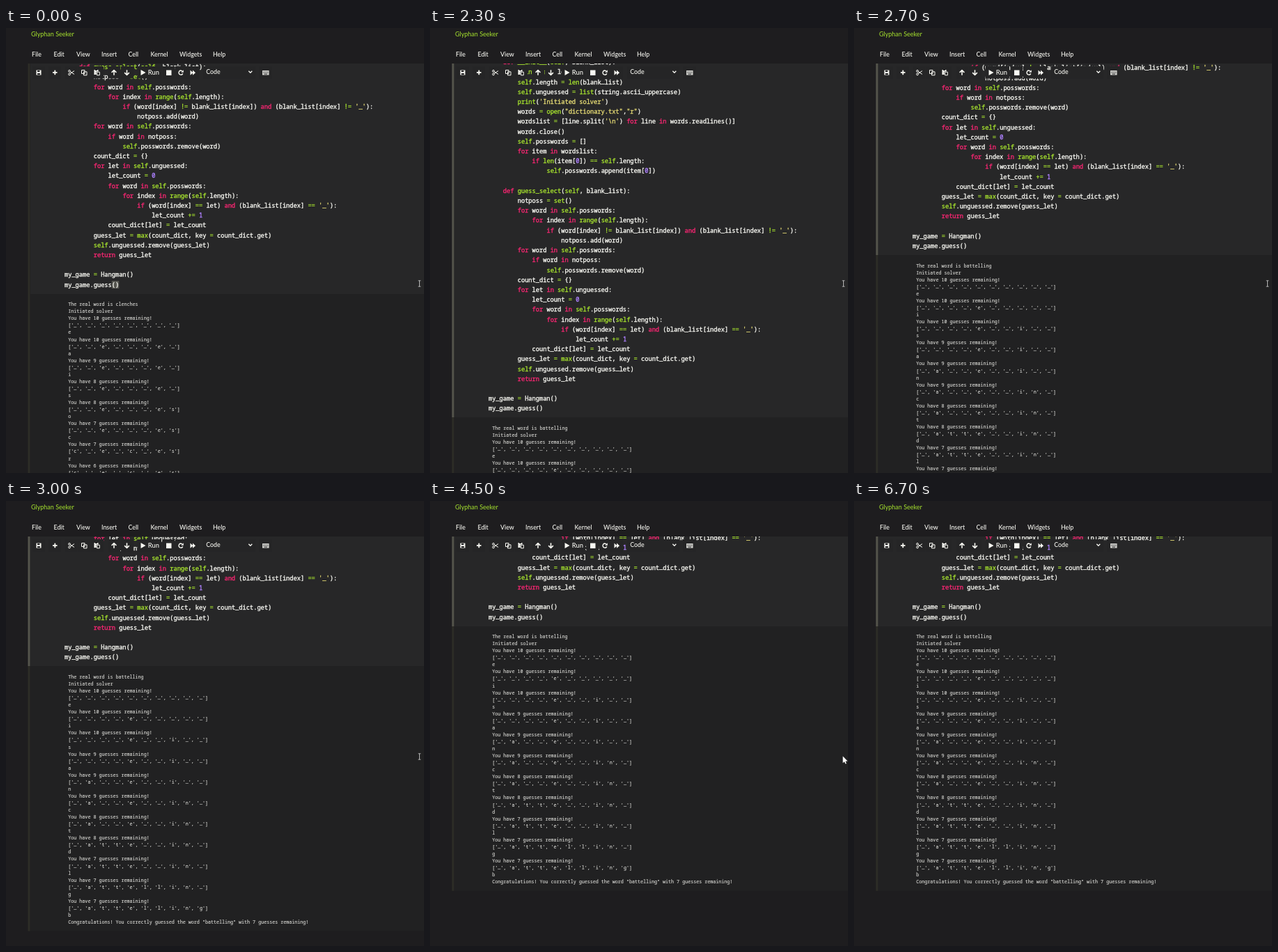
Animation, 600 px wide and 639 px high, one loop 6900 ms. Source, as an HTML page with a canvas:

```html
<!DOCTYPE html>
<html lang="en">
<head>
<meta charset="utf-8">
<title>Notebook</title>
<style>
html, body { margin: 0; width: 100%; height: 100%; overflow: hidden; background: #1e1d1f; }
canvas { display: block; }
</style>
</head>
<body>
<canvas id="stage" width="600" height="639"></canvas>
<script>
const ctx = document.getElementById('stage').getContext('2d');
const W = 600, H = 639, LOOP = 6900, STEP = 100, RUN_AT = 300;
const MONO = '"Noto Sans Mono", "DejaVu Sans Mono", monospace';
const SANS = 'Lato, "Open Sans", sans-serif';
const CODE = { x: 84, adv: 5.215, size: 8.69, lead: 14.206, weight: 0.35 };
const OUT = { x: 89.3, size: 6.7, lead: 10.06, top: 28.2, weight: 0.12 };
const INK = '#f8f8f2', GREEN = '#a6e22e', PINK = '#f92672', PURPLE = '#ae81ff', YELLOW = '#e6db74';
const PAGE = '#1e1d1f', INPUT = '#272728', OUTPUT = '#212122', BUTTON = '#252526';
const BAR = '#55554c', BAR_DIM = '#2d2d27', TOP = 51;

const source = String.raw`    def __init__(self, blank_list):
        print(self.length)
        self.length = len(blank_list)
        self.unguessed = list(string.ascii_uppercase)
        print('Initiated solver')
        words = open("dictionary.txt","r")
        wordslist = [line.split('\n') for line in words.readlines()]
        words.close()
        self.posswords = []
        for item in wordslist:
            if len(item[0]) == self.length:
                self.posswords.append(item[0])

    def guess_select(self, blank_list):
        notposs = set()
        for word in self.posswords:
            for index in range(self.length):
                if (word[index] != blank_list[index]) and (blank_list[index] != '_'):
                    notposs.add(word)
        for word in self.posswords:
            if word in notposs:
                self.posswords.remove(word)
        count_dict = {}
        for let in self.unguessed:
            let_count = 0
            for word in self.posswords:
                for index in range(self.length):
                    if (word[index] == let) and (blank_list[index] == '_'):
                        let_count += 1
            count_dict[let] = let_count
        guess_let = max(count_dict, key = count_dict.get)
        self.unguessed.remove(guess_let)
        return guess_let

my_game = Hangman()
my_game.guess()`;

const rules = [
  [/^('[^']*'|"[^"]*")/, YELLOW],
  [/^(for|in|if|and|def|return)\b/, PINK],
  [/^(self|range|len|list|set|open|max|print|__init__|guess_select)\b/, GREEN],
  [/^\w*[A-Za-z_]\w*/, INK],
  [/^\d+/, PURPLE],
  [/^[!=+]?=/, GREEN],
  [/^[^\w\s'"=!+]+/, INK]
];

function tokenize(line) {
  const tokens = [];
  for (let col = 0; col < line.length;) {
    const rest = line.slice(col);
    const rule = rules.find(r => r[0].test(rest));
    const text = rule ? rule[0].exec(rest)[0] : rest[0];
    if (rule) tokens.push({ col, text, color: rule[1] });
    col += text.length;
  }
  return tokens;
}
const codeLines = source.split('\n').map(tokenize);

// Plays one round and returns everything it prints.
function playRound(word, guesses) {
  const lines = ['The real word is ' + word, 'Initiated solver'];
  let left = 10, known = '';
  const status = () => {
    const cells = [...word].map(c => `'${known.includes(c) ? c : '_'}'`);
    lines.push(`You have ${left} guesses remaining!`, `[${cells.join(', ')}]`);
  };
  status();
  for (const letter of guesses) {
    known += letter;
    if (!word.includes(letter)) left--;
    lines.push(letter);
    if ([...word].every(c => known.includes(c))) {
      lines.push(`Congratulations! You correctly guessed the word "${word}" with ${left} guesses remaining!`);
    } else status();
  }
  return lines;
}
const firstRun = playRound('clenches', 'eaisocr');
const secondRun = playRound('battelling', 'eisanctdlgb');

// [time, y of the last code line]
const scrollKeys = [[2300, 546.3], [2500, 430], [2700, 313], [3000, 224.3], [3300, 166.5]];
function scrollAt(t) {
  if (t < RUN_AT) return 368.6;
  if (t <= scrollKeys[0][0]) return scrollKeys[0][1];
  for (let i = 1; i < scrollKeys.length; i++) {
    const [t0, y0] = scrollKeys[i - 1], [t1, y1] = scrollKeys[i];
    if (t <= t1) return y0 + (y1 - y0) * (t - t0) / (t1 - t0);
  }
  return scrollKeys[scrollKeys.length - 1][1];
}
function outputAt(t) {
  if (t < RUN_AT) return firstRun;
  const count = t < 400 ? 0 : t < 600 ? 2 : t < 1200 ? 4 : t < 2400 ? 7 : secondRun.length;
  return secondRun.slice(0, count);
}

function box(x, y, w, h, color) {
  ctx.fillStyle = color;
  ctx.fillRect(x, y, w, h);
}
function label(text, x, y, font, color = INK, weight = 0) {
  ctx.font = font;
  ctx.fillStyle = ctx.strokeStyle = color;
  ctx.fillText(text, x, y);
  if (weight) {
    ctx.lineWidth = weight;
    ctx.strokeText(text, x, y);
  }
}
// Monospaced text with its underscores raised to the baseline.
function mono(text, x, y, style, color) {
  const font = `${style.size}px ${MONO}`;
  label(text.replace(/_/g, ' '), x, y, font, color, style.weight);
  if (text.includes('_')) {
    label(text.replace(/[^_]/g, ' '), x, y - style.size * 0.13, font, color, style.weight);
  }
}
function poly(points, color = INK) {
  ctx.fillStyle = color;
  ctx.beginPath();
  points.forEach(p => ctx.lineTo(p[0], p[1]));
  ctx.fill();
}
function stroke(width, draw, color = INK) {
  ctx.strokeStyle = color;
  ctx.lineWidth = width;
  ctx.beginPath();
  draw();
  ctx.stroke();
}
function segment(x0, y0, x1, y1) {
  ctx.moveTo(x0, y0);
  ctx.lineTo(x1, y1);
}

function drawCell(t) {
  const y = scrollAt(t), lines = outputAt(t), editing = t < RUN_AT;
  const split = Math.round(y + 13);
  box(35, TOP, W - 35, split - TOP, INPUT);
  box(31.5, TOP, 3, split - TOP, editing ? BAR_DIM : BAR);
  if (lines.length) {
    const bottom = y + OUT.top + (lines.length - 1) * OUT.lead + 13;
    box(35, split, W - 35, bottom - split, OUTPUT);
    box(31.5, split, 3, bottom - split, BAR_DIM);
  }
  if (editing) box(CODE.x + 13 * CODE.adv, y - 5.5, 2 * CODE.adv, 11, '#55554f');
  codeLines.forEach((tokens, i) => {
    const base = y + 3.1 - (codeLines.length - 1 - i) * CODE.lead;
    if (base < 48) return;
    for (const k of tokens) mono(k.text, CODE.x + k.col * CODE.adv, base, CODE, k.color);
  });
  lines.forEach((s, i) => mono(s, OUT.x, y + OUT.top + 2.4 + i * OUT.lead, OUT, '#d8d8d4'));
}

function drawHeader() {
  box(0, 0, W, TOP, PAGE);
  label('Glyphan Seeker', 36, 11.8, `9px ${SANS}`, GREEN);
  const menu = { File: 37, Edit: 68.5, View: 101, Insert: 137, Cell: 175.5, Kernel: 207.5, Widgets: 249, Help: 297 };
  for (const name in menu) label(name, menu[name], 41, `500 8.8px ${SANS}`);
}

function drawToolbar() {
  const buttons = [[38, 18], [61, 18], [85, 17], [103, 18], [122, 18], [147, 17], [165, 18],
    [189, 34], [225, 17], [243, 17], [260, 17], [283, 75], [363, 19]];
  for (const [x, w] of buttons) box(x, 55, w, 17.5, BUTTON);

  // save, add
  box(43.5, 60.5, 7, 7, INK);
  box(45, 61, 3.5, 2, BUTTON);
  box(45, 65, 4, 2, BUTTON);
  box(67, 63, 6.5, 1.8, INK);
  box(69.4, 60.6, 1.8, 6.6, INK);

  // cut
  stroke(1, () => {
    segment(92, 62.5, 98, 66.5);
    segment(92, 65.7, 98, 61.5);
    for (const y of [61.8, 66.4]) {
      ctx.moveTo(92.4, y);
      ctx.arc(91, y, 1.4, 0, 7);
    }
  });

  // copy, paste
  stroke(1, () => {
    ctx.rect(108.5, 60.5, 4.5, 5);
    ctx.rect(111.5, 62.8, 4.5, 5);
  });
  box(126.5, 60, 6, 7, INK);
  box(128, 60, 3, 1, BUTTON);
  box(129.5, 62.5, 5, 5.8, BUTTON);
  stroke(1, () => ctx.rect(130.5, 63.2, 3.8, 4.6));

  // move up, move down
  for (const [x, d] of [[155, -1], [173.5, 1]]) {
    stroke(1.6, () => {
      segment(x, 64 - 3.8 * d, x, 64 + 3 * d);
      segment(x - 3.4, 64 + 0.2 * d, x, 64 + 3.4 * d);
      ctx.lineTo(x + 3.4, 64 + 0.2 * d);
    });
  }

  // run, stop
  poly([[193.5, 60], [200.5, 64], [193.5, 68]]);
  label('Run', 203.8, 67.2, `500 9.4px ${SANS}`);
  box(230, 60.5, 7.5, 7.5, INK);

  // restart, run all
  stroke(1.4, () => ctx.arc(251, 64.2, 3, 0.4, 5.4));
  poly([[254.8, 60.2], [254.8, 63.8], [251.2, 63.8]]);
  for (const x of [264.5, 268]) poly([[x, 60.6], [x + 4, 64.2], [x, 67.8]]);

  // cell type, shortcuts
  label('Code', 287.3, 66.3, `500 8.8px ${SANS}`);
  stroke(1.3, () => {
    segment(348.3, 61.8, 350.8, 64.3);
    ctx.lineTo(353.3, 61.8);
  });
  box(368, 61, 9.5, 6.5, '#d8d8d4');
  for (let i = 0; i < 4; i++) {
    box(369.2 + i * 2, 62.3, 1, 1, BUTTON);
    box(369.2 + i * 2, 64, 1, 1, BUTTON);
  }
  box(370.5, 65.7, 4.5, 0.9, BUTTON);
}

function drawPointer(t) {
  if (t >= 5800) return;
  if (t < 3200) {
    stroke(0.9, () => {
      segment(593.5, 363, 593.5, 371);
      segment(591.7, 362.8, 595.3, 362.8);
      segment(591.7, 371.2, 595.3, 371.2);
    }, '#c4c4c4');
  } else {
    poly([[592.6, 366.5], [592.6, 376.3], [594.9, 374.2], [596.4, 377.5],
      [597.8, 376.9], [596.4, 373.7], [599.4, 373.5]], '#ffffff');
  }
}

function render(now) {
  const t = Math.floor(now % LOOP / STEP) * STEP;
  box(0, 0, W, H, PAGE);
  drawCell(t);
  drawHeader();
  drawToolbar();
  drawPointer(t);
}

ctx.lineJoin = 'round';
const start = performance.now();
function tick() {
  render(performance.now() - start);
  requestAnimationFrame(tick);
}
tick();
</script>
</body>
</html>
```
